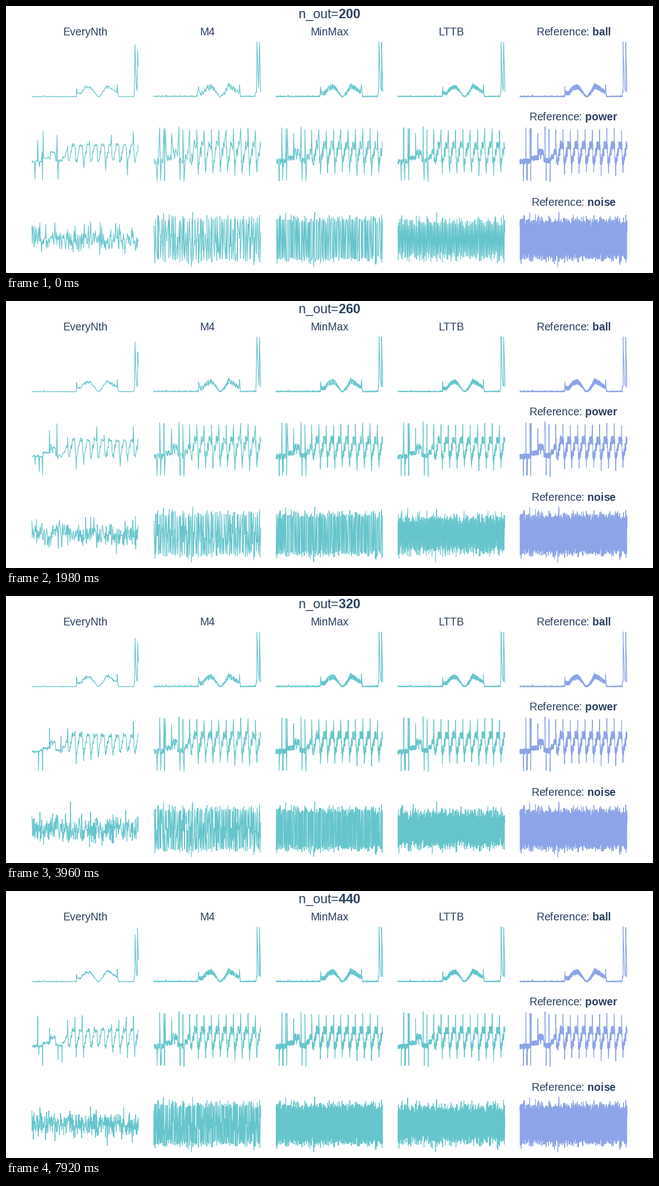
A matplotlib script for the animation above (8000 ms loop, 1163 px wide and 481 px high).

```python
import numpy as np
import matplotlib.pyplot as plt
from matplotlib.animation import FuncAnimation

W, H, DPI = 1163, 481, 64
LOOP, STEP, HOLD = 8000, 20, 660
N, SPAN = 50_000, 192
COL_X = 46.5 + 219.4 * np.arange(5)
ROW_Y = 64 + 153.4 * np.arange(3)
TEAL, BLUE, INK = "#66c5cc", "#8da5e8", "#2a3f5f"
PX = 72 / DPI

plt.rcParams.update({
    "font.family": "Liberation Sans",
    "mathtext.fontset": "custom",
    "mathtext.rm": "Liberation Sans",
    "mathtext.bf": "Liberation Sans:bold",
})

rng = np.random.default_rng(7)
u = np.arange(N) / N * SPAN


# Signals: pixels below the top of a 100 px tall row

def curve(x, points):
    return np.interp(x, *zip(*points))


def spike(y, at, peak, width=0.3):
    m = (u >= at) & (u < at + width)
    y[m] = peak + (y[m] - peak) * ((u[m] - at) / width) ** 1.5


def make_ball():
    h = curve(u, [
        (0, .7), (21, .7), (22, 2.6), (24, .8), (80, .7), (80.3, 14), (81.5, 7),
        (88, 7), (92, 13), (98, 18), (104, 18), (107, 15.5), (113, 8),
        (117, 2.5), (119, .8), (121, .8), (127, 8), (133, 18), (135, 19.5),
        (143, 16), (147, 12), (154, 9), (155.5, 1), (160, .7), (183.5, .7),
        (184.2, 10), (192, 10)])
    rough = curve(u, [(79, 0), (81, 1), (98, 1.5), (107, 1.3), (119, 0),
                      (133, 1.7), (143, 1.4), (155, .7), (157, 0)])
    h += rng.normal(0, 1, N) * rough + rng.laplace(0, .25, N)
    spike(h, 80.3, 18.5, .5)
    spike(h, 153.6, 23, .4)
    for at, top in (185.2, 100), (189.8, 99):
        m = u >= at
        d = u[m] - at
        fall = 70 * np.exp(-(d / 1.9) ** 2) + (top - 80) * np.exp(-d / .25)
        h[m] = np.maximum(h[m], 10 + fall)
    h[-60:] = 9
    return 100 - np.clip(h, 0, 100)


def make_power():
    y = curve(u, [
        (0, 62.5), (18, 61.5), (20, 57), (33, 56), (33.5, 46), (36, 44),
        (37, 53), (38, 45), (42, 47), (43, 60), (54, 62), (56, 55), (60, 54),
        (61, 46), (64, 45)])
    period = 13.15
    phase = (u - 77.2) / period % 1
    cycle = curve(phase, [
        (0, 34), (.06, 37), (.09, 60), (.3, 63), (.32, 55), (.41, 57),
        (.45, 44), (.58, 47), (.61, 33), (1, 34)])
    busy = u >= 64
    y[busy] = cycle[busy]
    y += rng.normal(0, 1, N) * curve(u, [(0, 1.4), (32, 1.4), (36, 2.2),
                                         (43, 1.4), (60, 1.6), (68, 2.3)])
    for at, peak in [(10.4, 1.5), (18, 3), (20.1, 3), (31.7, 12), (45, 0),
                     (52, 5), (5.7, 98), (12, 97), (13.2, 96), (19.2, 97),
                     (47, 97), (54, 99)]:
        spike(y, at, peak)
    for k in range(10):
        spike(y, 64 + period * k, rng.uniform(2, 7))
        if k:
            spike(y, 66.6 + period * k, rng.uniform(82, 90), .35)
    return y


def make_noise():
    y = np.clip(49 + rng.normal(0, 12, N), 4.5, 95)
    for at, value in [(0, 25), (17.3, 1.5), (67.5, 99.5), (69.6, 0),
                      (179.5, 95.5)]:
        y[int(at / SPAN * N)] = value
    y[-1] = 37
    return y


# Downsamplers: each returns the chosen indices

def every_nth(y, n):
    return np.arange(0, N, N / n).astype(int)


def binned(y, bins, ends):
    edges = np.linspace(0, N, bins + 1).astype(int)
    out = []
    for lo, hi in zip(edges, edges[1:]):
        part = y[lo:hi]
        picks = [lo + part.argmin(), lo + part.argmax()]
        out += sorted(picks + [lo, hi - 1] if ends else picks)
    return np.array(out)


def m4(y, n):
    return binned(y, n // 4, True)


def min_max(y, n):
    return binned(y, n // 2, False)


def lttb(y, n):
    edges = np.append(np.linspace(1, N - 1, n - 1).astype(int), N)
    out, a = [0], 0
    for lo, hi, nxt in zip(edges, edges[1:], edges[2:]):
        cx, cy = (hi + nxt - 1) / 2, y[hi:nxt].mean()
        j = np.arange(lo, hi)
        area = np.abs((a - cx) * (y[lo:hi] - y[a]) - (a - j) * (cy - y[a]))
        a = lo + int(area.argmax())
        out.append(a)
    return np.array(out + [N - 1])


SIGNALS = {"ball": make_ball(), "power": make_power(), "noise": make_noise()}
METHODS = {"EveryNth": every_nth, "M4": m4, "MinMax": min_max, "LTTB": lttb}

fig = plt.figure(figsize=(W / DPI, H / DPI), dpi=DPI, facecolor="white")
ax = fig.add_axes([0, 0, 1, 1])
ax.set(xlim=(0, W), ylim=(H, 0))
ax.axis("off")


def label(x, y, text, size=19.5):
    return ax.text(x, y, text, size=size * PX, color=INK, ha="center",
                   va="baseline")


def trace(color):
    return ax.plot([], [], color=color, lw=1.25 * PX,
                   solid_joinstyle="bevel", solid_capstyle="butt")[0]


def place(y, idx, col, row):
    return COL_X[col] + u[idx], ROW_Y[row] + y[idx]


def title_text(n):
    return rf"n_out=$\mathbf{{{n}}}$"


for col, name in enumerate(METHODS):
    label(COL_X[col] + SPAN / 2, 53, name)
for row, (name, y) in enumerate(SIGNALS.items()):
    label(COL_X[4] + SPAN / 2, ROW_Y[row] - 11,
          rf"Reference: $\mathbf{{{name}}}$")
    trace(BLUE).set_data(*place(y, m4(y, 8 * SPAN), 4, row))

title = label(581.5, 22, title_text(200), 23.5)
lines = [trace(TEAL) for _ in range(len(METHODS) * len(SIGNALS))]


def sample(n):
    return [place(y, pick(y, n), col, row)
            for row, y in enumerate(SIGNALS.values())
            for col, pick in enumerate(METHODS.values())]


COUNTS = [200 + 20 * k for k in range(LOOP // HOLD + 1)]
STATES = [sample(n) for n in COUNTS]


def update(i):
    k = i * STEP // HOLD
    title.set_text(title_text(COUNTS[k]))
    for line, xy in zip(lines, STATES[k]):
        line.set_data(*xy)
    return [title, *lines]


anim = FuncAnimation(fig, update, frames=LOOP // STEP, interval=STEP,
                     repeat=True, repeat_delay=0, cache_frame_data=False)
plt.show()
```
